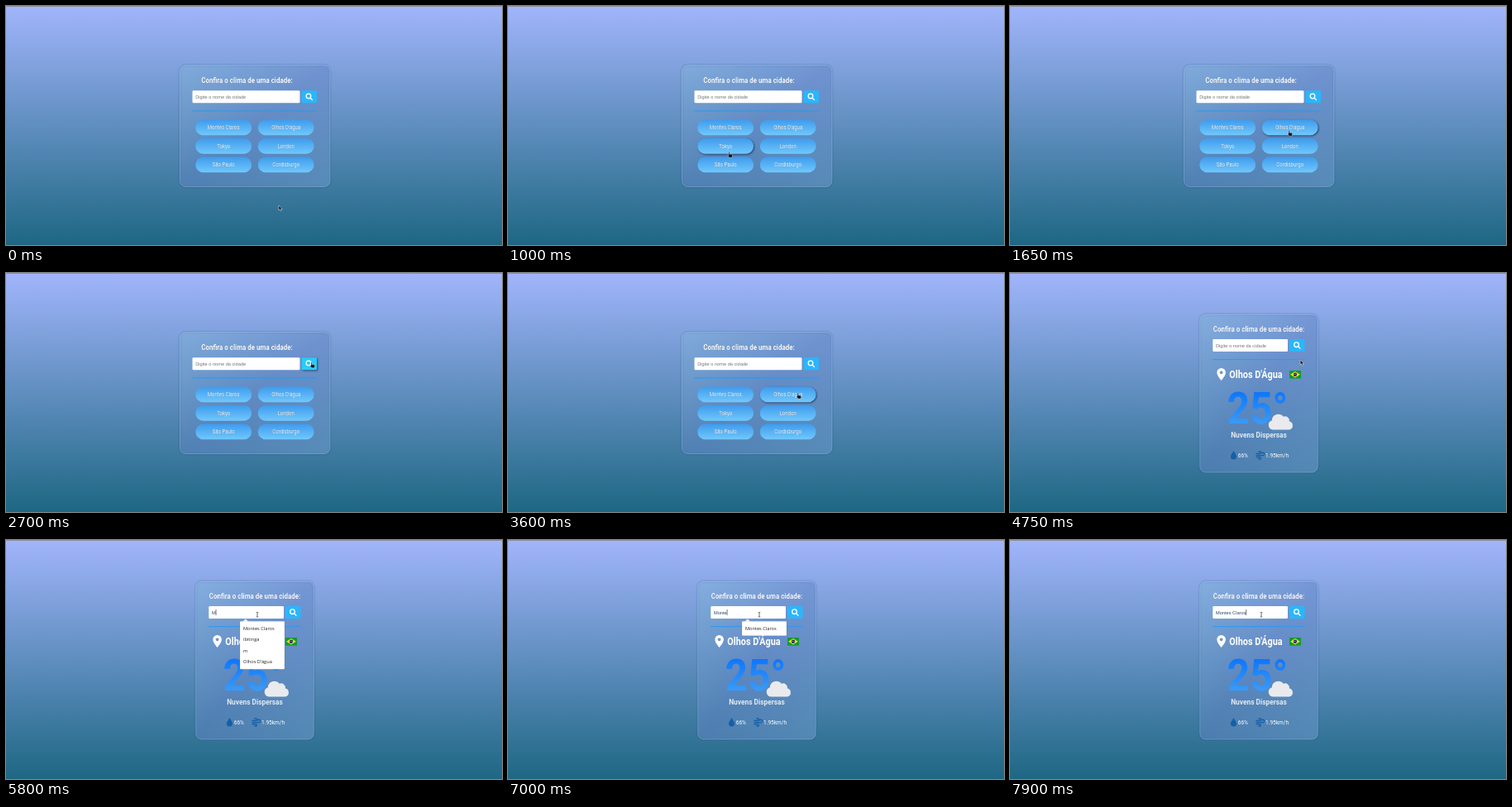
Animation of 600x289 px, one loop 8 s. Source, as an HTML page:

```html
<!DOCTYPE html>
<html lang="pt">
<head>
<meta charset="utf-8">
<title>Clima</title>
<style>
html, body { margin: 0; width: 100%; height: 100%; overflow: hidden; }
svg { display: block; width: 100vw; height: 100vh; }
text { font: 6.85px Roboto, sans-serif; fill: #fff; white-space: pre; }
.bold { font-weight: 700; }
.shade { filter: drop-shadow(.5px .6px .5px rgba(20, 50, 100, .5)); }
.field text { font: 5.66px "Liberation Sans", Arial, sans-serif; }
.popup text { font: 5.65px "Open Sans", "Noto Sans", sans-serif; fill: #222; }
.hover { filter: drop-shadow(1px 1.2px 1.2px rgba(10, 30, 70, .65)); }
.search.hover > rect { fill: #25cdf8; }
</style>
</head>
<body>
<svg viewBox="0 0 600 289" preserveAspectRatio="none">
  <defs>
    <linearGradient id="sky" x2="0" y2="1">
      <stop stop-color="#a1b5fb"/><stop offset="1" stop-color="#1e6783"/>
    </linearGradient>
    <linearGradient id="glass" x2="1" y2="1">
      <stop stop-color="#7fb5d8" stop-opacity=".45"/>
      <stop offset=".5" stop-color="#6286c6" stop-opacity=".5"/>
      <stop offset="1" stop-color="#6797c6" stop-opacity=".6"/>
    </linearGradient>
    <linearGradient id="pill" x2="0" y2="1">
      <stop stop-color="#3f9bed"/><stop offset="1" stop-color="#70c8fb"/>
    </linearGradient>
    <linearGradient id="heat" gradientUnits="userSpaceOnUse" x1="0" y1="-40" x2="0" y2="2">
      <stop stop-color="#0c74fb"/><stop offset="1" stop-color="#3c9df6"/>
    </linearGradient>
  </defs>
  <rect width="600" height="289" fill="url(#sky)"/>
  <rect width="600" height="1" fill="#8f8f98"/>

  <g id="home"></g>

  <g id="weather">
    <g id="result">
      <path fill="#fff" fill-rule="evenodd" d="M255.6 130C252 125.5 250.3 123 250.3 120.3a5.3 5.3 0 0 1 10.6 0C260.9 123 259.200 125.500 255.600 130ZM255.600 118.400a1.900 1.900 0 1 0 .01 0Z"/>
      <g id="flag">
        <rect x="338" y="118" width="14" height="9.600" fill="#129a32"/>
        <path d="M339.200 122.800 345 119l5.800 3.800-5.800 3.800Z" fill="#fde01a"/>
        <circle cx="345" cy="122.800" r="2.200" fill="#18286e"/>
        <path d="M343 122.300q2.200-.3 3.900 1.300" fill="none" stroke="#fff" stroke-width=".4"/>
      </g>
      <path id="cloud" fill="#e9eaee" d="M318 189.500a5.800 5.800 0 0 1-1.200-11.300A8 8 0 0 1 331 173.700a5 5 0 0 1 6.800 5.500A5.300 5.300 0 0 1 338 189.500Z"/>
      <path fill="#155fa6" d="M270.500 215c1.500 3 3.500 4.700 3.500 7a3.500 3.500 0 0 1-7 0c0-2.300 2-4 3.500-7Z"/>
      <path fill="none" stroke="#155fa6" stroke-width="1.300" stroke-linecap="round" d="M298 218.500h4.300a1.400 1.400 0 1 0-1.300-2M298 220.600h8a1.700 1.700 0 1 0-1.500-2.600M298 222.700h4a1.300 1.300 0 1 1-1.200 1.600"/>
    </g>
  </g>

  <g id="popup" class="popup"></g>

  <g id="cursor" stroke-linejoin="round">
    <path id="arrow" fill="#111" stroke="#e8eef5" stroke-width=".5" d="M0 0v6l1.400-1.200 1 2.200 1-.5-1-2.100h1.900Z"/>
    <path id="hand" fill="#111" stroke="#dfe8f2" stroke-width=".4" d="M-.5.200Q0-.4.600.200V2.600L3.300 3Q4.200 3.200 4 4.200L3.500 6.800H.2L-1.600 4.200Q-1.500 3.300-.5 4Z"/>
    <path id="beam" fill="none" stroke="#333" stroke-width=".7" d="M-1.300-2.900Q0-2.900 0-2.200V2.200Q0 2.900-1.300 2.900M1.300-2.900Q0-2.900 0-2.200M0 2.200Q0 2.900 1.300 2.900"/>
  </g>
</svg>
<script>
const $ = id => document.getElementById(id);
const show = (el, on) => { el.style.display = on ? '' : 'none'; };
const add = (parent, markup, where = 'beforeend') => parent.insertAdjacentHTML(where, markup);

// Condensed face: one constant narrowing for every label.
const label = (x, y, str, size, attrs = '', anchor = 'middle') =>
  `<text transform="translate(${x} ${y}) scale(.88 1)" text-anchor="${anchor}" style="font-size:${size}px" ${attrs}>${str}</text>`;

const card = (x, y, w, h) => ['stroke="#1d4680" stroke-opacity=".13" stroke-width="4" fill="none"',
  'fill="url(#glass)" stroke="#c5dcf5" stroke-opacity=".38" stroke-width=".8"']
  .map(a => `<rect x="${x}" y="${y}" width="${w}" height="${h}" rx="7" ${a}/>`).join('');

const form = (x, y, w, titleX) => `
  ${label(titleX, y - 9, 'Confira o clima de uma cidade:', 9.05, 'class="bold shade"')}
  <g class="field">
    <rect x="${x}" y="${y}" width="${w}" height="15" rx="1.300" fill="#fff"/>
    <text class="hint" x="${x + 3.7}" y="${y + 9.500}" style="fill:#757575">Digite o nome da cidade</text>
  </g>
  <g class="search">
    <rect x="${x + w + 2}" y="${y}" width="18.500" height="15" rx="1.300" fill="#2bb6fa"/>
    <g fill="none" stroke="#fff" stroke-width="1.300" stroke-linecap="round">
      <circle cx="${x + w + 10.500}" cy="${y + 6.700}" r="2.800"/>
      <path d="M${x + w + 12.700} ${y + 8.900}l2.300 2.300"/>
    </g>
  </g>
  <rect x="${x}" y="${y + 24.200}" width="${w + 20.500}" height="1" fill="#279af0"/>`;

const cities = ['Montes Claros', "Olhos D'água", 'Tokyo', 'London', 'São Paulo', 'Cordisburgo'];
const home = $('home'), weather = $('weather'), popup = $('popup');

add(home, card(210.5, 71.8, 181.3, 146.7) + form(225.5, 102.3, 130, 291.5));
cities.forEach((city, i) => {
  const x = 229.3 + i % 2 * 75.5, y = 137.6 + (i >> 1) * 22.5;
  add(home, `<g class="pill">
    <rect x="${x}" y="${y}" width="67.800" height="18.600" rx="9.300" fill="url(#pill)"/>
    ${label(x + 33.9, y + 11.7, city, 6.85, 'class="shade"')}</g>`);
});

add(weather, card(229.8, 50.3, 142.4, 190.7) + form(245.3, 80, 90.7, 301), 'afterbegin');
add($('result'), label(297.5, 127.3, "Olhos D'Água", 12.3, 'class="bold"')
  + label(301, 199.3, 'Nuvens Dispersas', 9.5, 'class="bold" fill-opacity=".82"')
  + label(275.8, 223.4, '66%', 7.4, '', 'start')
  + label(309, 223.4, '1.95km/h', 7.4, '', 'start'));
$('cloud').insertAdjacentHTML('beforebegin',
  label(262.5, 182.3, '25°', 54.5, 'class="bold heat"', 'start'));
document.querySelector('.heat').style.fill = 'url(#heat)';
add(weather.querySelector('.field'),
  '<text id="typed" x="249" y="89.500" style="fill:#26466e"></text><rect id="caret" y="84" width=".6" height="7" fill="#222"/>');

add(popup, `<rect x="283" width="54" y="98.200" rx="1" id="sheet" fill="#fff" stroke="#456" stroke-opacity=".25" stroke-width=".5"/>
  <path d="M286.500 98.400l3.300-3 3.300 3Z" fill="#fff"/>`);
['Montes Claros', 'ibitinga', 'm', "Olhos D'água"].forEach((s, i) =>
  add(popup, `<text x="287" y="${108.8 + i * 13.5}">${s}</text>`));
const items = [...popup.querySelectorAll('text')];

// Pointer path: time, x, y
const path = [
  [0, 330, 241], [250, 326, 222], [500, 338, 192], [750, 285, 192], [900, 262, 189],
  [1000, 267.5, 176.5], [1200, 258, 152], [1400, 290, 146], [1650, 337.5, 150.5],
  [1900, 342, 168], [2100, 338, 190], [2300, 345, 165], [2550, 364, 115],
  [2700, 369.5, 108], [3000, 376, 117], [3400, 393, 134], [3650, 340, 148],
  [3800, 338, 150], [4000, 335.3, 152.5], [4300, 346, 149], [4550, 376, 125],
  [4800, 345, 100], [5050, 304, 90.3], [8000, 304, 90.3]];
const keys = [5800, 6000, 6150, 6300, 7000, 7100, 7300, 7400, 7500, 7600, 7700, 7800, 7850];

function pointer(t) {
  const i = path.findIndex(p => p[0] > t), [t0, x0, y0] = path[i - 1], [t1, x1, y1] = path[i];
  const k = (t - t0) / (t1 - t0);
  return [x0 + (x1 - x0) * k, y0 + (y1 - y0) * k];
}

const hits = (g, x, y) => {
  const r = g.querySelector('rect'), v = n => +r.getAttribute(n);
  return x >= v('x') && x <= v('x') + v('width') && y >= v('y') && y <= v('y') + v('height');
};

function draw(now) {
  const t = Math.floor(now % 8000 / 50) * 50;
  const [x, y] = pointer(t), loaded = t >= 3800;
  const page = loaded ? weather : home;
  show(home, !loaded);
  show(weather, loaded);
  show($('flag'), t >= 4300);

  let kind = hits(page.querySelector('.field'), x, y) ? 'beam' : 'arrow';
  page.querySelectorAll('.pill, .search').forEach(g => {
    const over = hits(g, x, y);
    g.classList.toggle('hover', over);
    if (over) kind = 'hand';
  });
  for (const id of ['arrow', 'hand', 'beam']) show($(id), id === kind);
  $('cursor').setAttribute('transform', `translate(${x} ${y})`);

  const count = keys.filter(k => k <= t).length, typed = $('typed');
  typed.textContent = 'Montes Claros'.slice(0, count);
  show(weather.querySelector('.hint'), !count);
  show($('caret'), t >= 5450);
  if (loaded) $('caret').setAttribute('x', 249 + (count ? typed.getComputedTextLength() : 0));

  show(popup, count > 0 && count < keys.length);
  const rows = count > 1 ? 1 : items.length;
  $('sheet').setAttribute('height', 4 + rows * 13.5);
  items.forEach((el, i) => show(el, i < rows));
  requestAnimationFrame(draw);
}
requestAnimationFrame(draw);
</script>
</body>
</html>
```
